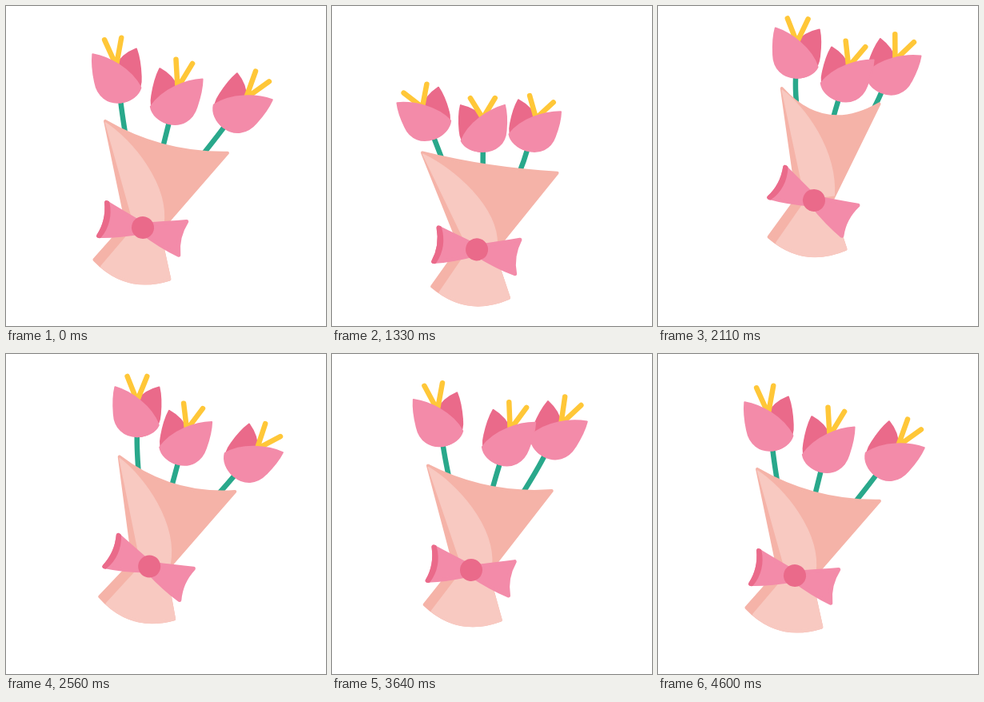
Recreate the animation shown at these times as an HTML page with a canvas. Size 400 by 400 pixels, loop 4.63 s.

```html
<!DOCTYPE html>
<html lang="en">
<head>
<meta charset="utf-8">
<title>Tulip bouquet</title>
<style>
  html, body { margin: 0; height: 100%; overflow: hidden; background: #fff; }
  canvas { display: block; width: 100vmin; height: 100vmin; }
</style>
</head>
<body>
<canvas></canvas>
<script>
const LOOP = 4630;
const SALMON = '#f5b3a8', BLUSH = '#f8c9c1', PINK = '#f38ba9',
      ROSE = '#ea6a8a', YELLOW = '#ffc738', GREEN = '#29a88b';

// Each pose: bow x, y, wrap angle, wrap stretch, bow angle, bloom squash,
// then per flower: stem angle, stem length, bloom tilt.
const rest = [171, 277, 14.6, 1, 13.4, 1,  -10, 158, -7,  14, 133, 14,  39, 160, 37];
const keys = [
  [1030, rest],
  [1500, [189, 318, 4, .9, 3, .85,  -29, 141, -31,  -4, 114, -11,  18, 122, 0]],
  [1660, [195, 291, 2, .937, -8.5, .86,  -31.4, 144, -36,  -7, 115, -16.2,  14, 118.6, -7]],
  [2110, [195, 243, 9, 1.127, 27.7, .957,  -8.6, 154, 2,  13.6, 127.6, 17,  32, 158, 23]],
  [2500, [182, 262, 16, 1.04, 25, .97,  -6, 162, 0,  15, 132, 15,  42, 155, 39]],
  [3010, [158, 291, 19.8, .98, 14, .93,  -3, 158, 1,  18.5, 127, 14.5,  47.5, 143, 40.6]],
  [3330, [172, 277, 9, 1, 4, .96,  -21, 154, -22,  5, 133, 2,  25, 152, 15]],
  [3640, [174, 270, 11.5, 1, 10.4, .985,  -12.8, 158, -9,  15, 135.6, 17,  32.7, 168, 27.5]],
  [4180, [171, 277, 14.6, 1, 13.6, 1,  -12, 158, -9,  14, 133, 14,  41, 160, 41]],
  [4600, rest]
];

const canvas = document.querySelector('canvas');
const ctx = canvas.getContext('2d');
const rad = deg => deg * Math.PI / 180;

// Smooth spline through the poses, at rest at both ends.
function poseAt(t) {
  const last = keys.length - 1;
  if (t <= keys[0][0] || t >= keys[last][0]) return rest;
  const i = keys.findIndex(k => k[0] > t) - 1;
  const [t0, a] = keys[i], [t1, b] = keys[i + 1];
  const span = t1 - t0, u = (t - t0) / span;
  const slope = (k, n) => k === 0 || k === last ? 0 :
    (keys[k + 1][1][n] - keys[k - 1][1][n]) / (keys[k + 1][0] - keys[k - 1][0]) * span;
  const ease = u * u * (3 - 2 * u);
  return a.map((v, n) => v + (b[n] - v) * ease
    + slope(i, n) * u * (1 - u) ** 2 - slope(i + 1, n) * u * u * (1 - u));
}

// Filled shape whose corners are rounded by a stroke of the same colour.
function shape(color, d, round = 2) {
  const path = new Path2D(d);
  ctx.fillStyle = ctx.strokeStyle = color;
  ctx.lineWidth = round;
  ctx.fill(path);
  ctx.stroke(path);
}

function line(color, width, d) {
  ctx.strokeStyle = color;
  ctx.lineWidth = width;
  ctx.stroke(new Path2D(d));
}

function place(x, y, angle, draw) {
  ctx.save();
  ctx.translate(x, y);
  ctx.rotate(rad(angle));
  draw();
  ctx.restore();
}

function flower(bowX, bowY, lean, length, tilt, squash, mirror) {
  const x = bowX + length * Math.sin(rad(lean));
  const y = bowY - length * Math.cos(rad(lean));
  const bendX = x - 50 * Math.sin(rad(tilt)), bendY = y + 50 * Math.cos(rad(tilt));
  line(GREEN, 6.5, `M${x} ${y}Q${bendX} ${bendY} ${bowX} ${bowY}`);
  place(x, y, tilt, () => {
    const spread = 10.6 + 53 * (1 - squash);
    const base = -47 * squash, top = base - 34 + 98 * (1 - squash);
    ctx.save();
    ctx.scale(mirror, squash);
    shape(ROSE, 'M27.5-65C30-54 30-42 29-30C28-12 16-1 0-1V-47C6-56 16-62 27.5-65Z');
    ctx.restore();
    line(YELLOW, 6.5, `M${-spread} ${top}L0 ${base}L${spread} ${top}`);
    ctx.scale(mirror, squash);
    shape(PINK, 'M-27.5-65C-30-54-30-42-29-30C-28-12-16-1 0-1C13-1 23-7 27-16C18-41-8-59-27.5-65Z');
  });
}

function wrap(stretch) {
  const e = stretch - 1, wide = 1 - 1.4 * e - 2.6 * e * e;
  const p = (x, y) => `${x * wide} ${y * stretch} `;
  const rim = -117 * stretch, sag = 11 + 110 * e;
  shape(SALMON, `M${p(-79, -117)}Q0 ${rim + 2 * sag} ${p(79, -117)}
    L21 0L48.5 54Q0 84-48.5 54L-21 0Z`, 4);
  shape(BLUSH, `M${p(-78, -115)}C${p(-40, -102)}18 ${-60 * stretch} 24-10L-11 0Z`, 1.5);
  shape(BLUSH, 'M-8 0L-37 60Q5 81 48.5 54L21 0Z', 4);
}

function bow() {
  for (const side of [-1, 1]) {
    ctx.save();
    ctx.scale(side, 1);
    shape(PINK, 'M0-4Q30-13 51.5-20Q44 2 51.5 23Q28 18 0 6Z', 5);
    ctx.restore();
  }
  shape(ROSE, 'M-51.5-20Q-44 2-51.5 23L-50 23Q-40 2-50-20Z', 5);
  ctx.fillStyle = ROSE;
  ctx.beginPath();
  ctx.arc(0, 0, 14, 0, 2 * Math.PI);
  ctx.fill();
}

function draw(t) {
  const [x, y, angle, stretch, bowAngle, squash, ...stems] = poseAt(t);
  const size = Math.round(canvas.clientWidth * devicePixelRatio);
  if (canvas.width !== size) canvas.width = canvas.height = size;
  ctx.setTransform(size / 400, 0, 0, size / 400, 0, 0);
  ctx.clearRect(0, 0, 400, 400);
  ctx.lineCap = ctx.lineJoin = 'round';
  for (const i of [2, 1, 0]) {
    const [lean, length, tilt] = stems.slice(i * 3);
    flower(x, y, lean, length, tilt, squash, i ? -1 : 1);
  }
  place(x, y, angle, () => wrap(stretch));
  place(x, y, bowAngle, bow);
}

function tick() {
  draw(performance.now() % LOOP);
  requestAnimationFrame(tick);
}
tick();
</script>
</body>
</html>
```
